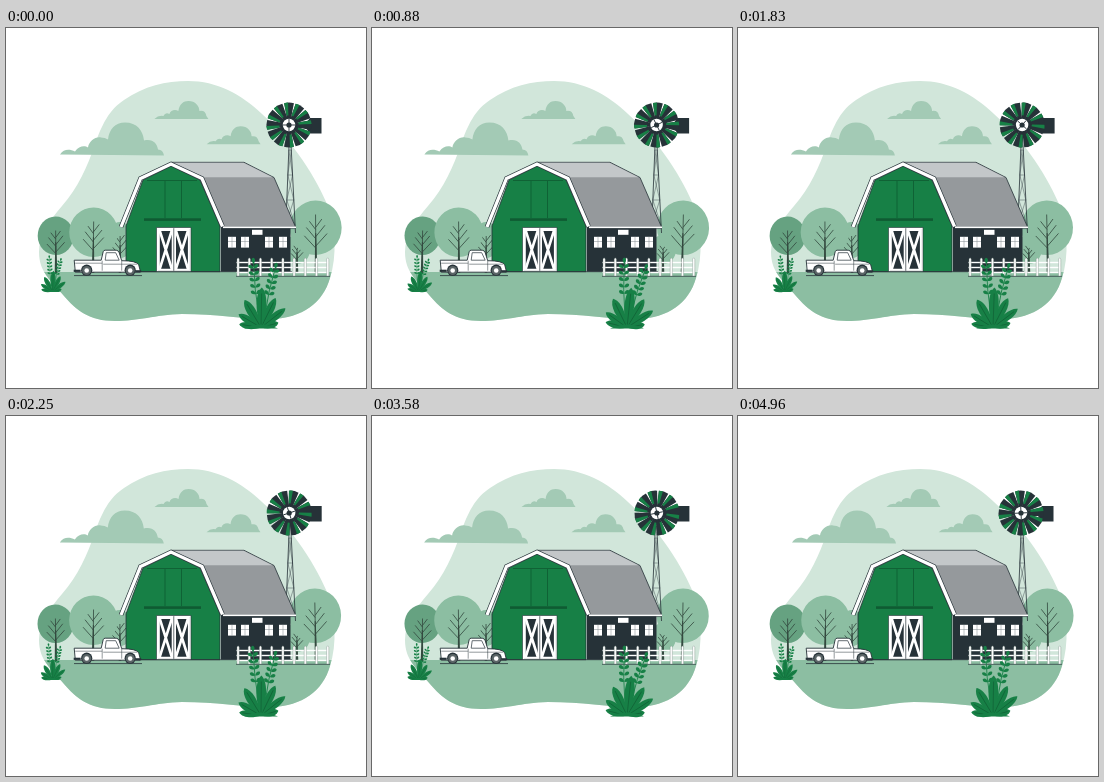
Recreate the animation shown at these times as an HTML page with a canvas. Size 360x360 px, loop 5 s.

```html
<!DOCTYPE html>
<html lang="en">
<head>
<meta charset="utf-8">
<title>Farm</title>
<style>
html, body { margin: 0; width: 100%; height: 100%; overflow: hidden; background: #fff; }
canvas { display: block; width: 360px; height: 360px; }
</style>
</head>
<body>
<canvas id="stage"></canvas>
<script>
const canvas = document.getElementById('stage');
const ctx = canvas.getContext('2d');
const ratio = window.devicePixelRatio || 1;
canvas.width = canvas.height = 360 * ratio;

const GREEN = '#178046', DARK = '#263238', SAGE = '#8cbea2', MIST = '#d1e6da';
const CLOUD = '#a3cab5', DEEP = '#0f5b32', TRUNK = '#33493f', WHITE = '#fff';
const TAU = Math.PI * 2, LOOP = 5000;

const sky = new Path2D('M33 224C33 207 44 192 56 178C72 160 82 137 88 119C96 96 103 82 118 72C138 58 160 53 182 53C211 53 235 66 256 86C282 109 306 141 321 176C330 199 331 228 324 250C317 275 296 290 266 291C234 291 211 286 176 286C148 287 133 293 109 293C83 293 70 282 58 268C46 253 33 245 33 224Z');
const bigCloud = new Path2D('M53 127C57 121 63 122 68 124C72 118 78 118 81 120C82 114 88 109 94 110Q98 110 101 112C102 102 108 95 118 95C130 95 136 103 137 113C146 111 150 116 151 122Q156 122 157 128Z');
const smallCloud = new Path2D('M149 91Q153 87 158 88Q160 84 164 86C165 82 170 81 173 83C174 76 178 73 183 73C190 73 194 78 194 83Q200 82 201 88L203 91Z');

function fill(path, color) { ctx.fillStyle = color; ctx.fill(path); }
function stroke(path, color, width) {
  ctx.strokeStyle = color;
  ctx.lineWidth = width;
  ctx.stroke(path);
}
function shape(d, color, line, width = 0.8) {
  const path = new Path2D(d);
  if (color) fill(path, color);
  if (line) stroke(path, line, width);
}
function rect(x, y, w, h, color) { ctx.fillStyle = color; ctx.fillRect(x, y, w, h); }
function oval(x, y, rx, ry, color) {
  ctx.beginPath();
  ctx.ellipse(x, y, rx, ry, 0, 0, TAU);
  ctx.fillStyle = color;
  ctx.fill();
}
function placed(x, y, angle, draw) {
  ctx.save();
  ctx.translate(x, y);
  ctx.rotate(angle);
  draw();
  ctx.restore();
}

function tree(x, rx, top, low, angle, color) {
  const h = 245 - top, ry = (low - top) / 2;
  placed(x, 245, angle, () => {
    oval(0, -h + ry, rx, ry, color);
    const s = h / 70;
    const limbs = [[-24, 11, 12], [-33, 9, 11], [-42, 6, 8]];
    let d = `M0 0V${-h + 14}`;
    for (const [y, w, up] of limbs) {
      d += `M0 ${y * s}L${-w * s} ${(y - up) * s}M0 ${(y - 2) * s}L${w * s} ${(y - 2 - up) * s}`;
    }
    shape(d, null, TRUNK, 0.8);
    shape(`M-1.3 0L-.5 ${-h * 0.55}H.5L1.3 0Z`, TRUNK);
  });
}

function leaf(x, y, length, width, angle, color, vein) {
  placed(x, y, angle, () => {
    const l = -length;
    shape(`M0 0C${-width} ${l * 0.4} ${-width} ${l * 0.85} 0 ${l}C${width} ${l * 0.85} ${width} ${l * 0.4} 0 0Z`, color);
    if (vein) shape(`M0 0V${l * 0.85}`, null, DEEP, 0.6);
  });
}

function sprig(x, y, height, size, angle) {
  placed(x, y, angle, () => {
    shape(`M0 0Q-2 ${-height / 2} 0 ${-height}`, null, GREEN, size * 0.14);
    for (let i = 0; i < 5; i++) {
      const py = -height * (0.42 + i * 0.12);
      for (const side of [-1, 1]) leaf(-0.6, py, size, size * 0.38, side, GREEN);
    }
    leaf(0, -height + 1, size, size * 0.38, 0, GREEN);
  });
}

function plant(x, y, s, sway) {
  placed(x, y, 0, () => {
    ctx.scale(s, s);
    sprig(-2, -12, 54, 6, -0.06 + sway * 0.05);
    sprig(4, -14, 48, 6, 0.26 + sway * 0.05);
    const leaves = [[-1.38, 22, 4.5], [1.35, 18, 4.5], [-1, 26, 5], [0.95, 31, 5],
                    [-0.5, 32, 6], [0.5, 33, 5.5], [0.06, 40, 6.5]];
    for (const [a, len, w] of leaves) {
      leaf(0, -1, len, w, a + sway * 0.05, GREEN, true);
    }
    shape('M-17 0Q-8 -4 0 -4Q8 -4 17 0Z', GREEN);
  });
}

function tower() {
  shape('M283.3 110L279.5 205M284.7 110L289.5 205', null, DARK, 0.8);
  let d = '';
  for (let y = 122; y < 190; y += 25) {
    const left = at => 283.3 - (at - 110) * 0.04;
    const right = at => 284.7 + (at - 110) * 0.05;
    d += `M${left(y)} ${y}H${right(y)}L${left(y + 25)} ${y + 25}M${left(y)} ${y}L${right(y + 25)} ${y + 25}`;
  }
  shape(d, null, DARK, 0.4);
}

function windmill(t, sway) {
  tower();
  placed(284 + sway, 97, 0, () => {
    shape('M-1.5 6L0 18L2 6Z', DARK);
    shape('M5 -2H17L21 -7H32.5V8.5H21L17 3H5Z', DARK);
    for (let i = 0; i < 12; i++) {
      placed(0, 0, t / LOOP * TAU + i * TAU / 12, () => {
        shape('M-1.9 -6L-4.9 -21.8Q0 -23.4 4.9 -21.8L1.9 -6Z', DARK);
        shape('M-2.5 -9.5L-4.9 -21.8Q-3 -22.4 -1 -22.6L-.6 -9.5Z', GREEN);
      });
    }
    oval(0, 0, 7.4, 7.4, DARK);
    oval(0, 0, 6.2, 6.2, WHITE);
    placed(0, 0, t / LOOP * TAU, () => shape('M-6 0H6M0 -6V6', null, DARK, 0.9));
    oval(0, 0, 2.6, 2.6, DARK);
  });
}

function doorPanel(x) {
  rect(x, 201, 15.5, 41.5, DARK);
  shape(`M${x + 1.5} 202L${x + 14} 241.5M${x + 14} 202L${x + 1.5} 241.5`, null, WHITE, 2.6);
  shape(`M${x + 0.8} 202H${x + 14.7}V241.7H${x + 0.8}Z`, null, WHITE, 2);
}

function barn() {
  rect(215, 197, 69.5, 46.7, DARK);
  for (const x of [222, 235, 259, 273]) {
    rect(x, 208.8, 8, 10.8, WHITE);
    shape(`M${x + 4} 208.8V219.6M${x} 213.5H${x + 8}`, null, '#7c878b', 0.5);
  }
  rect(246, 201.8, 10.5, 5, WHITE);

  shape('M165 134.3H238L268 149.5L289.5 199H217L197 149.5Z', '#95999c', DARK);
  shape('M166 134.7H237.6L266.5 149.3H197Z', '#c3c7c9');
  shape('M217 199.4H290', null, WHITE, 1.8);
  shape('M217 200.6H290', null, DARK, 0.6);

  shape('M120 243.7V198L137 152L165 138L194 152L214 198V243.7Z', GREEN, DARK);
  shape('M141 152.5H191M159 153V190M175.5 153V190', null, DEEP, 0.8);
  rect(138, 190.3, 57, 2.6, DEEP);

  ctx.lineJoin = 'miter';
  const eaves = 'M115 199L134.5 150.5L165 136L196 150.5L216.5 198.5';
  shape(eaves, null, DARK, 4.6);
  shape(eaves, null, WHITE, 3.3);

  rect(150.5, 199.5, 34.5, 44, WHITE);
  doorPanel(152);
  doorPanel(168.2);
  shape('M150.5 243.5V199.5H185V243.5M167.8 200V243', null, DARK, 0.6);
  shape('M115 243.7H286', null, DARK, 0.8);
}

function truck() {
  shape('M68 247.6H136', null, DARK, 0.8);
  placed(-0.8, -0.3, 0, () => {
    shape('M70 243L69 232.5H96L98 224Q98.5 222.5 100 222.5H111Q113 222.5 114 225L116.5 233Q131 233 133.5 237L135 243V244.5H70Z', WHITE, DARK, 0.9);
    shape('M100 232.5L101 225H110.5L114 232.5Z', WHITE, DARK, 0.7);
    shape('M97 233V243M116.5 233V243M70 235.5H97M98 236.5H132', null, DARK, 0.5);
    rect(68.5, 242, 7, 2.2, DARK);
    rect(130, 242.5, 6, 2, DARK);
    for (const x of [81.5, 125]) {
      oval(x, 242.5, 5.6, 5.6, DARK);
      oval(x, 242.8, 4.5, 4.5, '#5b6567');
      oval(x, 242.8, 2.3, 2.3, WHITE);
    }
  });
}

function fence() {
  shape('M230 248.3H324', null, DARK, 0.7);
  for (const y of [233.8, 238.8, 243.8]) rect(230.5, y, 92, 1.4, WHITE);
  for (let i = 0; i < 9; i++) {
    const x = 231 + i * 11.2;
    shape(`M${x} 248V231L${x + 1.1} 229.8L${x + 2.2} 231V248Z`, WHITE, '#6b7f76', 0.35);
  }
}

function clouds(sway) {
  const drift = [[bigCloud, -sway, -0.6], [smallCloud, sway * 0.6, 0], [smallCloud, 51 - sway * 0.6, 25.3]];
  for (const [path, x, y] of drift) placed(x, y, 0, () => fill(path, CLOUD));
}

function draw(t) {
  const wave = shift => -Math.cos((t / LOOP * 2 + shift) * TAU);
  const sway = wave(0);
  ctx.setTransform(ratio, 0, 0, ratio, 0, 0);
  rect(0, 0, 360, 360, WHITE);

  fill(sky, MIST);
  ctx.save();
  ctx.clip(sky);
  rect(0, 244, 360, 60, SAGE);
  ctx.restore();

  clouds(sway);
  tree(114, 13, 194, 230, 0.01 * wave(0.3), SAGE);
  tree(50, 18, 188.5, 227, 0.014 * wave(0.15), '#66a281');
  tree(87, 24.3, 179.5, 229, -0.013 * sway, SAGE);
  tree(291, 13, 207, 236, 0.01 * wave(0.3), SAGE);
  tree(310, 26, 172.5, 227, 0.025 * wave(0.2), SAGE);

  windmill(t, sway);
  barn();
  truck();
  fence();
  plant(46.5, 264, 0.52, wave(0.2));
  plant(255, 300.5, 1, wave(0.1));
}

function tick(now) {
  draw(now % LOOP);
  requestAnimationFrame(tick);
}
draw(0);
requestAnimationFrame(tick);
</script>
</body>
</html>
```
